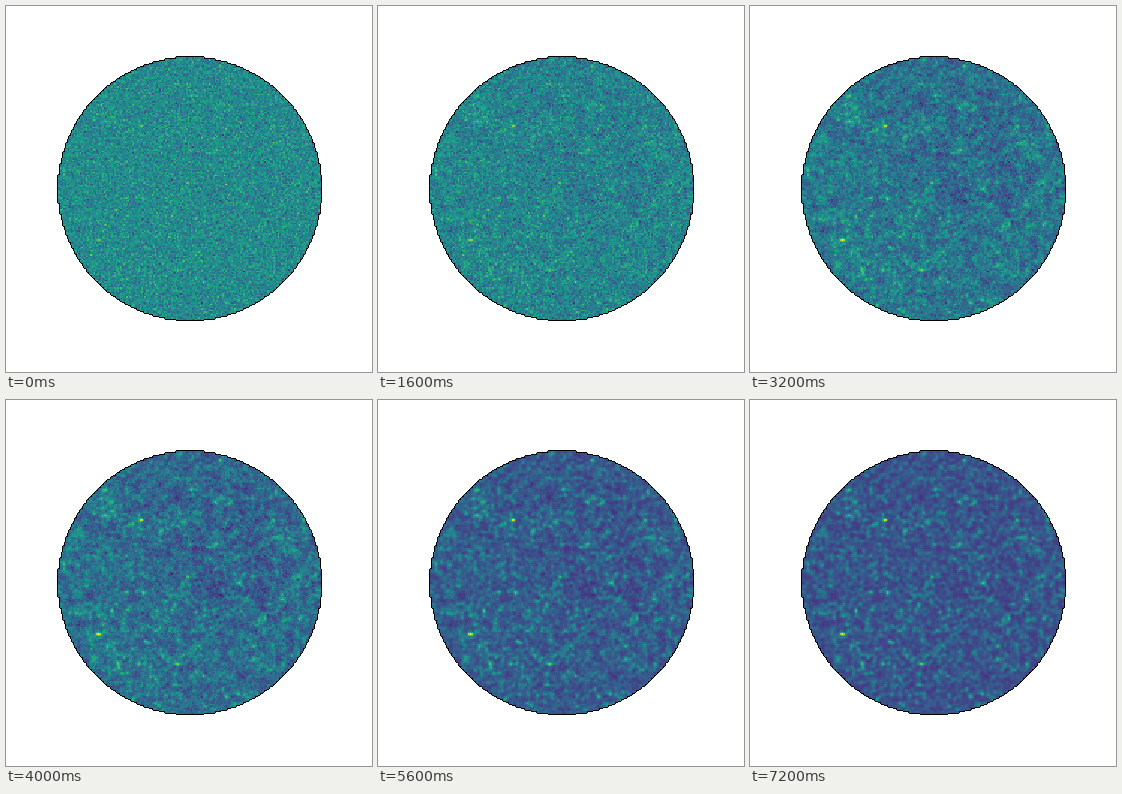
A matplotlib script that plays this animation: 366 px wide and 366 px high, repeating every 8 s.

```python
import numpy as np
import matplotlib.pyplot as plt
from matplotlib.animation import FuncAnimation

SIZE, DPI = 366, 100
STEPS, STEP_MS = 10, 800
LEFT, TOP, DISC = 52, 51, 263    # disc box in pixels
CELLS = 175                      # field cells across the disc

rng = np.random.default_rng(12)
axis = np.linspace(-1, 1, CELLS)
gx, gy = np.meshgrid(axis, axis)
inside = np.hypot(gx, gy) <= CELLS / (CELLS - 1)


def standardise(field):
    return (field - field[inside].mean()) / field[inside].std()


def smooth(field, sigma):
    """Gaussian blur in the Fourier domain, wrapping at the edges."""
    fx = np.fft.rfftfreq(CELLS)[None, :]
    fy = np.fft.fftfreq(CELLS)[:, None]
    gain = np.exp(-2 * (np.pi * sigma) ** 2 * (fx ** 2 + fy ** 2))
    return np.fft.irfft2(np.fft.rfft2(field) * gain, s=field.shape)


def to_stage(field):
    """Enlarge the cell grid to stage pixels without interpolation."""
    index = np.arange(DISC) * CELLS // DISC
    stage = np.zeros((SIZE, SIZE), dtype=field.dtype)
    stage[TOP:TOP + DISC, LEFT:LEFT + DISC] = field[np.ix_(index, index)]
    return stage


def outline(mask):
    """Pixels just outside the mask, sharing a side with it."""
    near = np.zeros_like(mask)
    for ax_, shift in ((0, 1), (0, -1), (1, 1), (1, -1)):
        near |= np.roll(mask, shift, axis=ax_)
    return near & ~mask


white = rng.standard_normal((CELLS, CELLS))
blobs = standardise(np.exp(0.4 * standardise(smooth(white, 0.95))))
patches = standardise(standardise(smooth(white, 1.7))
                      + 0.7 * standardise(smooth(white, 4)))
broad = standardise(np.hypot(gx - 0.25, gy + 0.3))
disc = to_stage(inside)
ring = outline(disc)


def render(step):
    u = step / (STEPS - 1)
    e = u * u * (3 - 2 * u)
    passing = 4 * e * (1 - e)
    value = (0.48 - 0.20 * e
             + 0.09 * (1 - e ** 1.3) * white
             + 0.02 * passing * patches
             + 0.014 * passing * broad
             + 0.07 * e * blobs)
    rgb = plt.cm.viridis(to_stage(np.clip(value, 0, 1)))[..., :3]
    rgb[~disc] = 1
    rgb[ring] = 0
    return rgb


fig = plt.figure(figsize=(SIZE / DPI, SIZE / DPI), dpi=DPI, facecolor="white")
ax = fig.add_axes([0, 0, 1, 1])
ax.axis("off")
image = ax.imshow(render(0), interpolation="nearest", aspect="auto")


def update(step):
    image.set_data(render(step))
    return (image,)


anim = FuncAnimation(fig, update, frames=STEPS, interval=STEP_MS,
                     repeat=True, repeat_delay=0, blit=False)
plt.show()
```
